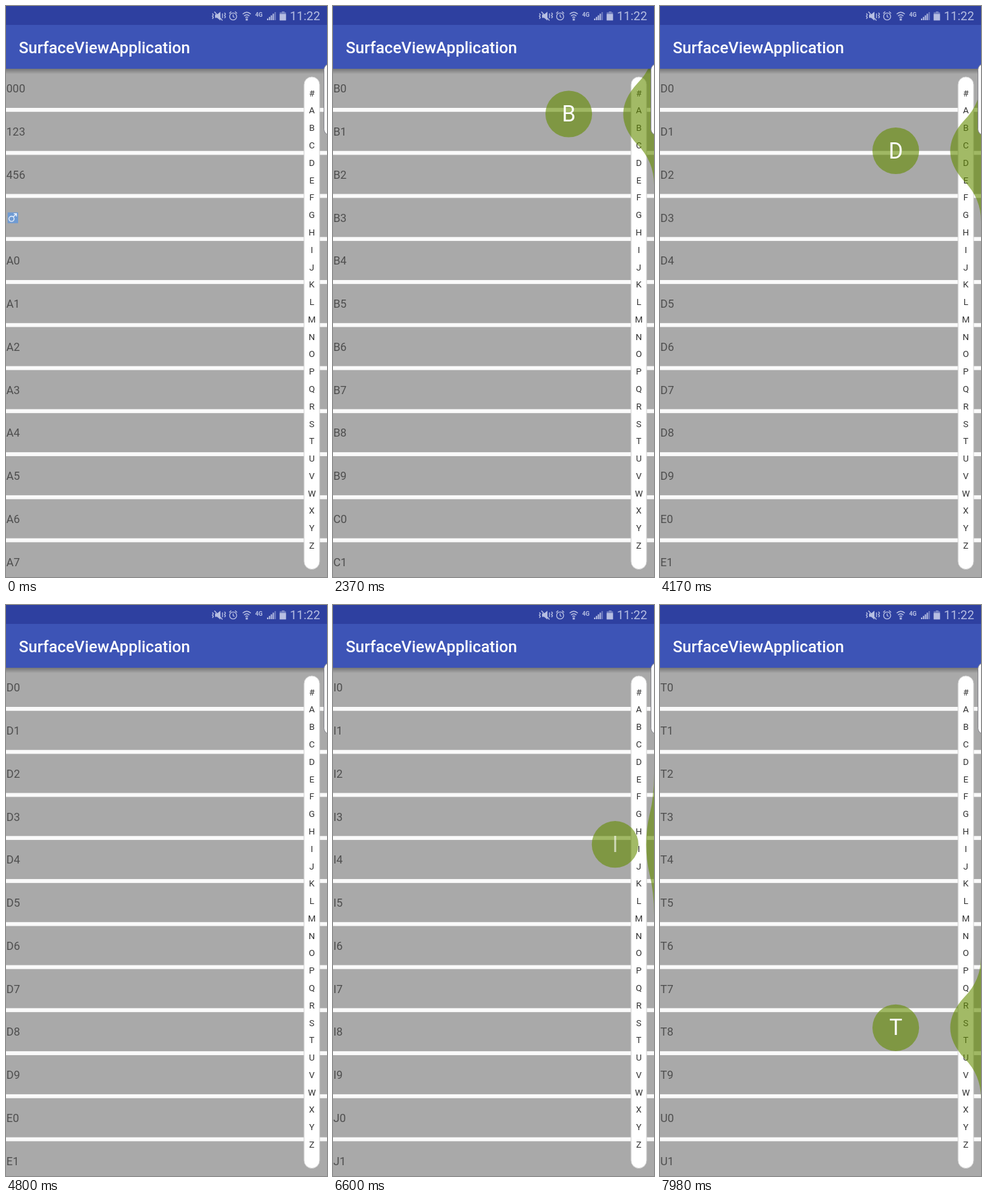
Animation, 476 px wide and 846 px high, one loop 8 s. Source, as an HTML page with a canvas:

```html
<!DOCTYPE html>
<html lang="en">
<head>
<meta charset="utf-8">
<title>Wave side bar</title>
<style>
  html, body { margin: 0; width: 100%; height: 100%; overflow: hidden; background: #fafafa; }
  canvas { display: block; width: 476px; height: 846px; }
</style>
</head>
<body>
<canvas width="476" height="846"></canvas>
<script>
const ctx = document.querySelector('canvas').getContext('2d');
const W = 476, H = 846, LOOP = 8000, STEP = 30;
const BAR_BOTTOM = 93, ROW_PITCH = 63.77, ROW_GAP = 5.8;
const LETTERS = '#ABCDEFGHIJKLMNOPQRSTUVWXYZ';
const LETTER_PITCH = 25.78, TOUCH_TOP = 104;
const WAVE_R = 35, BALL_R = 34.6, RATIO_MS = 300;
const WAVE_COLOR = 'rgba(101,140,0,.6)';
const ICON = '#b6bee2';

// Each touch: press time, release time and a path of [time, y].
const touches = [
  { down: 700, up: 4300, path: [[700, 116], [1350, 132], [2370, 160], [4170, 214.5]] },
  { down: 5284, up: 6464, path: [[5284, 354.7]] },
  { down: 7150, up: 9000, path: [[7150, 626.3]] }
];

const clamp01 = v => Math.min(1, Math.max(0, v));
const ease = v => 0.5 - Math.cos(Math.PI * clamp01(v)) / 2;

function pathY(path, t) {
  let [t0, y0] = path[0];
  for (const [t1, y1] of path.slice(1)) {
    if (t < t1) return y0 + (y1 - y0) * (t - t0) / (t1 - t0);
    [t0, y0] = [t1, y1];
  }
  return y0;
}

function stateAt(t) {
  const touch = touches.filter(p => t >= p.down).pop();
  if (!touch) return { ratio: 0, y: 0, index: 0 };
  const y = pathY(touch.path, Math.min(t, touch.up));
  const ratio = t < touch.up
    ? ease((t - touch.down) / RATIO_MS)
    : 1 - ease((t - touch.up) / RATIO_MS);
  return { ratio, y, index: Math.floor((y - TOUCH_TOP) / LETTER_PITCH) };
}

function text(str, x, y, size, color, align = 'left', weight = 400) {
  ctx.font = `${weight} ${size}px Roboto, sans-serif`;
  ctx.textAlign = align;
  ctx.fillStyle = color;
  ctx.fillText(str, x, y);
}

function rect(x, y, w, h, color) {
  ctx.fillStyle = color;
  ctx.fillRect(x, y, w, h);
}

function roundRect(x, y, w, h, r, fill, stroke) {
  ctx.beginPath();
  ctx.roundRect(x, y, w, h, r);
  ctx.fillStyle = fill;
  ctx.fill();
  if (stroke) {
    ctx.strokeStyle = stroke;
    ctx.lineWidth = 1;
    ctx.stroke();
  }
}

function strokePath(d, color = ICON, width = 1.3) {
  ctx.strokeStyle = color;
  ctx.lineWidth = width;
  ctx.stroke(new Path2D(d));
}

function fillPath(d, color = ICON) {
  ctx.fillStyle = color;
  ctx.fill(new Path2D(d));
}

function rowLabel(n) {
  if (n < 3) return ['000', '123', '456'][n];
  return LETTERS[1 + Math.floor((n - 4) / 10)] + (n - 4) % 10;
}

function drawSymbolIcon(y) {
  rect(2.5, y - 8, 15.5, 16, '#6f9bd3');
  strokePath(`M12 ${y + 1.5}a3.8 3.8 0 1 1 -7.6 0a3.8 3.8 0 1 1 7.6 0`
    + `M11 ${y - 1.5}l4.5 -4.5m-4 0h4v4`, '#e6eefa', 1.4);
}

function drawList(first) {
  rect(0, BAR_BOTTOM, W, H - BAR_BOTTOM, '#a9a9a9');
  for (let i = 0; i < 12; i++) {
    const top = BAR_BOTTOM + i * ROW_PITCH;
    if (first + i === 3) drawSymbolIcon(top + 29.5);
    else text(rowLabel(first + i), 0.5, top + 35.3, 16.6, 'rgba(0,0,0,.54)');
    rect(0, top + ROW_PITCH - ROW_GAP, W, ROW_GAP, '#fafafa');
  }
}

function drawLetters() {
  roundRect(442, 105, 23, 729.5, 11.5, '#fff', '#d0d0d0');
  [...LETTERS].forEach((letter, i) =>
    text(letter, 453.5, 133.7 + i * LETTER_PITCH, 13.2, '#333', 'center'));
}

function drawWave({ ratio, y, index }) {
  if (!ratio) return;
  const depth = ratio ** 2.45;
  const shoulder = W - WAVE_R * Math.SQRT1_2 * depth;
  const shoulderDy = WAVE_R * (2 - Math.SQRT1_2);
  const ballX = W + BALL_R - 161 * ratio;
  ctx.beginPath();
  ctx.moveTo(W, y - 3 * WAVE_R);
  ctx.quadraticCurveTo(W, y - 2 * WAVE_R, shoulder, y - shoulderDy);
  ctx.quadraticCurveTo(W - 1.9 * WAVE_R * depth, y, shoulder, y + shoulderDy);
  ctx.quadraticCurveTo(W, y + 2 * WAVE_R, W, y + 3 * WAVE_R);
  ctx.closePath();
  ctx.moveTo(ballX + BALL_R, y);
  ctx.arc(ballX, y, BALL_R, 0, 2 * Math.PI, true);
  ctx.fillStyle = WAVE_COLOR;
  ctx.fill();
  text(LETTERS[index], ballX, y + 11, 32.5, `rgba(255,255,255,${ratio})`, 'center');
}

function drawStatusIcons() {
  // Muted speaker with vibration marks
  fillPath('M310 12.5h3l5 -4v13l-5 -4h-3z');
  strokePath('M309 8.5l12 13M306 11l1.5 2l-1.5 2l1.5 2l-1.5 2'
    + 'M324 10l1.5 2l-1.5 2l1.5 2l-1.5 2M321 11v7');
  // Alarm clock
  strokePath('M342 15.5a5.2 5.2 0 1 1 -10.4 0a5.2 5.2 0 1 1 10.4 0'
    + 'M336.8 12.5v3.2l2 1.3M331 11l3 -2.8M342.6 11l-3 -2.8');
  // Wireless
  strokePath('M351 12q6 -5.5 12 0M353 14.8q4 -3.6 8 0M355 17.2q2 -1.8 4 0', ICON, 1.5);
  fillPath('M355.5 18.5h3v3h-3z');
  text('4G', 369.5, 15.5, 8.8, ICON, 'left', 700);
  // Signal bars
  for (let i = 0; i < 5; i++) {
    const h = 2.4 * (i + 1);
    rect(387 + i * 2.8, 21 - h, 2, h, i < 4 ? ICON : '#6e7cc0');
  }
  // Battery
  fillPath('M409 8h4v1.5h2.2v11.8h-9.4v-11.8h3.2z', '#7885c4');
  rect(405.8, 12, 9.4, 9.3, ICON);
}

function drawBars() {
  const shadow = ctx.createLinearGradient(0, BAR_BOTTOM, 0, BAR_BOTTOM + 8);
  shadow.addColorStop(0, 'rgba(0,0,0,.3)');
  shadow.addColorStop(1, 'rgba(0,0,0,0)');
  rect(0, BAR_BOTTOM, W, 8, shadow);
  rect(0, 0, W, 28, '#2e40a0');
  rect(0, 28, W, BAR_BOTTOM - 28, '#3d54b6');
  drawStatusIcons();
  text('11:22', 421, 21.3, 18, ICON);
  text('SurfaceViewApplication', 19, 70, 23.7, '#fff', 'left', 500);
}

function draw(now) {
  const t = Math.floor((now % LOOP) / STEP) * STEP;
  const state = stateAt(t);
  drawList(state.index ? 4 + (state.index - 1) * 10 : 0);
  drawLetters();
  drawWave(state);
  drawBars();
  roundRect(471.5, 85.5, 24, 106, [9, 0, 0, 9], '#fafafa', '#85858c');
}

let start;
function tick(now) {
  start ??= now;
  draw(now - start);
  requestAnimationFrame(tick);
}
requestAnimationFrame(tick);
</script>
</body>
</html>
```
